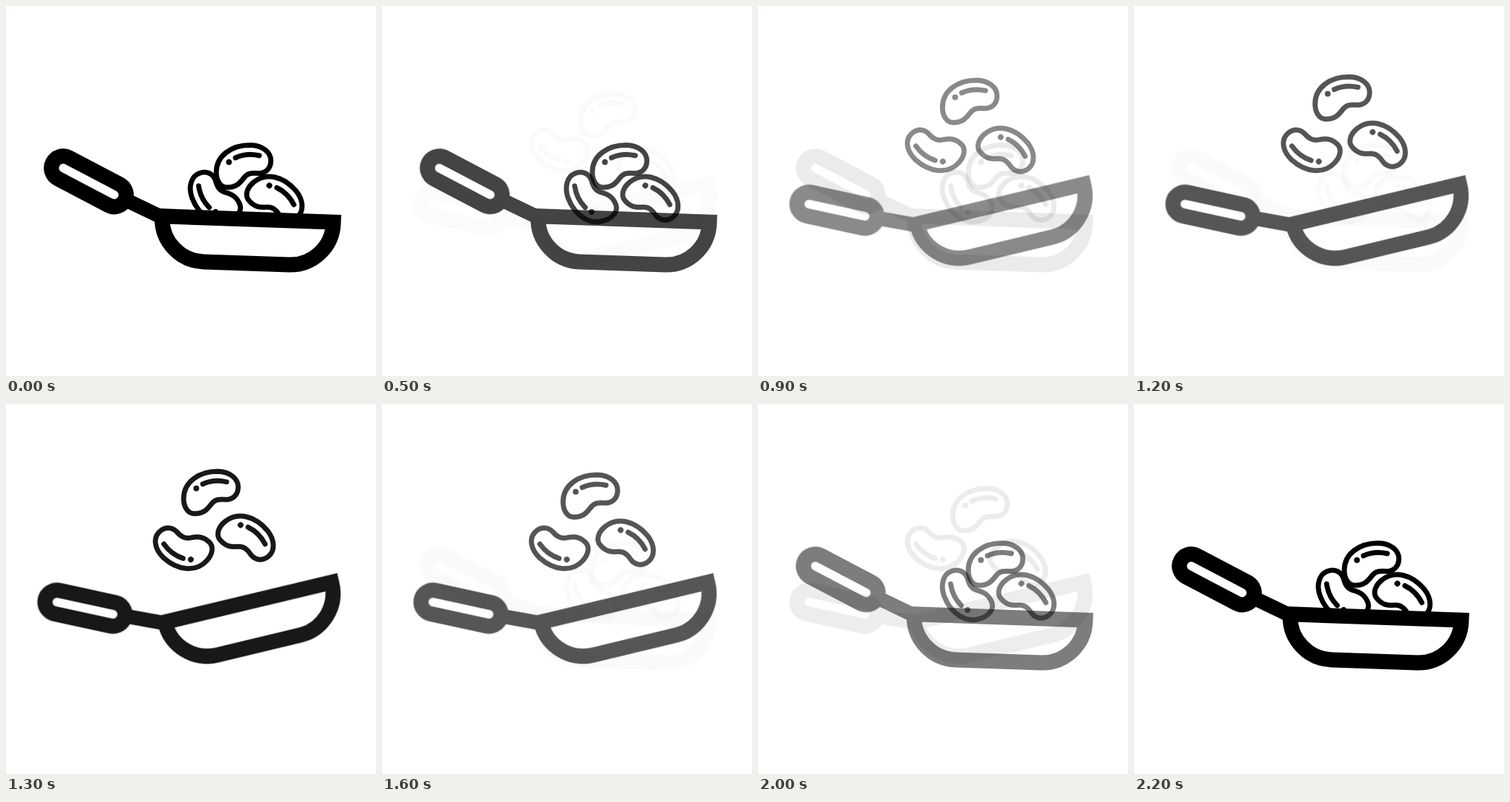
These frames come from a looping animation (512 by 512 pixels, 2700 ms). An HTML page:

```html
<!DOCTYPE html>
<html lang="en">
<head>
<meta charset="utf-8">
<title>Tossing beans in a pan</title>
<style>
  html, body { margin: 0; height: 100%; overflow: hidden; background: #fff; }
  svg { display: block; width: 100vw; height: 100vh; }
</style>
</head>
<body>
<svg viewBox="0 0 512 512">
  <defs>
    <g id="pan" fill="none" stroke="#000">
      <path d="M10.5 10.5H247.5V12A59.5 59.5 0 0 1 188 71.5H70A59.5 59.5 0 0 1 10.5 12Z"
            transform="translate(206 280) rotate(2)" stroke-width="21"/>
      <path d="M162 266.5L214 291.5" stroke-width="20"/>
      <rect x="-16.5" y="-16.5" width="112.6" height="33" rx="16.5"
            transform="translate(79.3 224.3) rotate(27.7)" stroke-width="21"/>
    </g>
    <g id="bean" fill="none" stroke="#000" stroke-width="7" stroke-linecap="round"
       transform="translate(-329 -222)">
      <path d="M291 230C291 207 312 192.5 338 192.5C356 193 366.5 203 366.5 214C366.5 225 359 232 349 231.5
               C340 230.5 334 231.5 329 238C323 246 318 251 306 251C297 251 291 242 291 230Z"/>
      <path d="M317.5 210Q333 203 350.5 207"/>
      <circle cx="308.5" cy="216" r="4" fill="#000" stroke="none"/>
    </g>
  </defs>
  <g id="rest"></g>
  <g id="toss"></g>
</svg>
<script>
const LOOP = 2700;
const STEPS = 7;
const RISE = [500, 600, 700, 800, 900, 1200, 1300];
const FALL = [1600, 1700, 1800, 1900, 2000, 2100, 2200];
const rest = document.getElementById('rest');
const toss = document.getElementById('toss');

const place = (x, y, angle) => `translate(${x} ${y}) rotate(${angle})`;
const use = (id, transform = '') => `<use href="#${id}" transform="${transform}"/>`;
const passed = (times, t) => times.filter(time => time <= t).length;

rest.innerHTML = use('pan')
  + use('bean', place(329, 222, 0))
  + use('bean', place(288.3, 263.7, -111))
  + use('bean', place(373, 268, 50));

toss.innerHTML = use('pan', 'rotate(-15.45 258.5 282)')
  + use('bean', place(244.5, 197, -138))
  + use('bean') + use('bean');
const [, , topBean, rightBean] = toss.children;

// Each part fades on its own, so overlapping parts look darker.
function fade(group, opacity) {
  for (const part of group.children) part.setAttribute('opacity', opacity);
}

function draw() {
  const t = performance.now() % LOOP;
  const step = passed(RISE, t) - passed(FALL, t);
  const left = STEPS - step;
  fade(rest, (left / STEPS) ** 2);
  fade(toss, 0.0185 * step ** 2);
  topBean.setAttribute('transform', place(283.8 + 4.75 * left, 122.8 + 4.7 * left, 0));
  rightBean.setAttribute('transform', place(333.2 + 5.6 * left, 187 + 7 * left, 50));
  requestAnimationFrame(draw);
}
draw();
</script>
</body>
</html>
```
